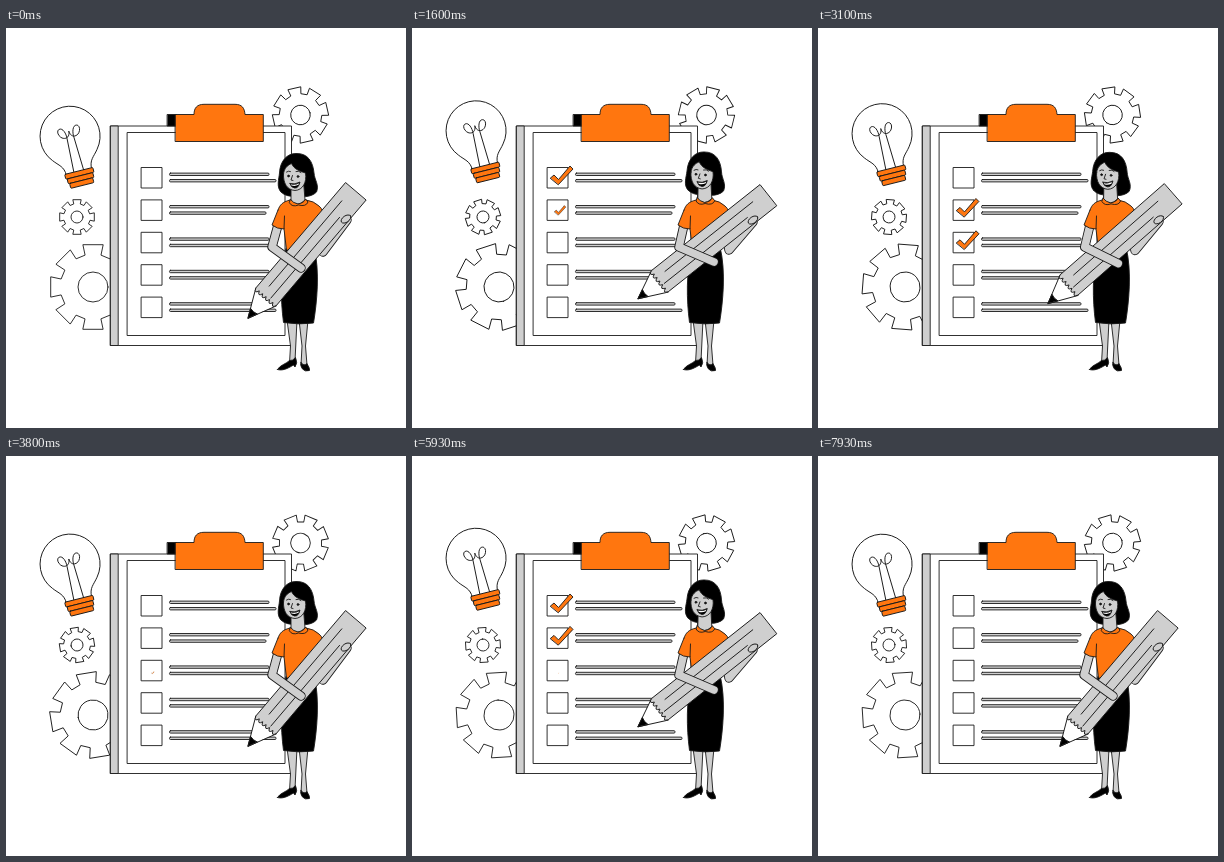
An HTML page for the animation above (8.01 s loop, 400 by 400 pixels).

```html
<!DOCTYPE html>
<html lang="en">
<head>
<meta charset="utf-8">
<title>Checklist</title>
<style>
  html, body { margin: 0; width: 100%; height: 100%; overflow: hidden; background: #fff; }
  svg { display: block; width: 100vw; height: 100vh; }
  .o { fill: #ff760f; }
  .g { fill: #cfcfcf; }
  .k { fill: #000; }
  .w { fill: #fff; }
  .n { fill: none; }
  .limb path { fill: none; stroke-width: 9.4; }
  .limb path + path { stroke: #cfcfcf; stroke-width: 7.6; }
</style>
</head>
<body>
<svg viewBox="0 0 400 400" stroke="#1a1a1a" stroke-width=".9" stroke-linejoin="round" stroke-linecap="round">
  <g id="gears" class="w"></g>

  <g id="bulb">
    <path class="w" d="M-13 37C-13 28 -18 26 -23 19.500A30 30 0 1 1 23 19.500C18 26 13 28 13 37Z"/>
    <path class="n" d="M-5 36L-3.500 2C-3 -3 -5 -10 -9 -9C-13 -8 -11 0 -6 1C-2 2 0 -2 0 -5C0 -2 2 2 6 1C11 0 13 -8 9 -9C5 -10 3 -3 3.500 2L5 36"/>
    <g id="base" class="o"></g>
  </g>

  <g id="board">
    <rect class="w" x="104.700" y="98" width="180.800" height="219.500"/>
    <rect class="g" x="104.700" y="98" width="7.500" height="219.500"/>
    <rect class="w" x="121.500" y="104.500" width="157.500" height="203"/>
    <rect class="k" x="161.500" y="86.500" width="9" height="11.500"/>
    <path class="o" d="M169.500 86.500H188C188 80 191 76.300 198 76.300H229C236 76.300 238.500 80 239 86.500H257.300V113.500H169.500Z"/>
  </g>
  <g id="rows"></g>

  <g id="legs">
    <path class="g" d="M281 292L284.500 318L283.500 335L289 333L291 292Z"/>
    <path class="g" d="M293 292L296 318L295 337L301 337L299.500 318L302 292Z"/>
    <path class="k" d="M271.500 341.500C274 337 280 336 283.500 332.500Q287 333 289.500 329.500Q292 335 289 339L287.500 337C281 341 276 343 271.500 341.500Z"/>
    <path class="k" d="M295 334.500Q298 339 301 335.500C302 338 304 340 303.500 342.500Q299 344 296.500 341Q294 338 295 334.500Z"/>
  </g>
  <path class="k" d="M280 221L308 219C314 243 311 274 307.500 295Q293 297 277.500 294.500C274.500 272 274 244 280 221Z"/>

  <g id="farArm" class="limb"><path/><path/></g>
  <path class="o" d="M284 172C276 174 274 177 272 182L278 201L280.500 222Q293 224 307 221L308 200L317 190Q318 182 313 178Q308 173 300 172Z"/>
  <g id="head">
    <path class="k" d="M275 164C270 159 273 151 273.500 145C274 133 281 125.500 290 125.500C302 125 307 134 308 145C308.500 152 313.500 157 310.500 164C305 170 294 169 288 168Q280 169 275 164Z"/>
    <path class="g" d="M285 158L285 173Q291 180 299 172L297.500 153Z"/>
    <path class="g" d="M277.500 146C278 140 282 137 285.500 135.500C288 141 293 143 299.500 145C301 154 297 162 289 162.500C281 162 277 155 277.500 146Z"/>
    <path class="n" d="M280.500 144Q282.500 142.500 284.500 143.500M290 143.500Q293 142.500 295 144.500M286.500 147.500L285 152L287 152.500"/>
    <circle class="k" cx="282.500" cy="148" r=".9"/>
    <circle class="k" cx="292" cy="148.500" r=".9"/>
    <path class="k" d="M284 155.500Q289 157 294 154Q292.500 160.500 288.500 160Q285 159.500 284 155.500Z"/>
    <path class="w" stroke="none" d="M285 156.200Q289 157.600 293 155.200L292.500 156.800Q289 158.600 285.500 157.400Z"/>
    <path class="o" d="M284.500 171.500Q287 175 292 176Q298 175 299.500 171L302 174Q300 179 292.500 177Q286 179.500 283.500 175Z"/>
  </g>

  <g id="pencil">
    <path class="w" d="M0 0L28 -13.500L31 0L28 13.500Z"/>
    <path class="k" d="M0 0L9 -4.300Q7.500 0 9 4.300Z"/>
    <path id="wood" class="g"/>
    <path class="n" d="M38 -4.500H150M30 4.500H136"/>
  </g>
  <g id="nearArm" class="limb"><path/><path/></g>
  <path class="o" d="M272 182L266 197Q271 201 278 201L278.500 188"/>
  <ellipse id="fingers" class="g" rx="5.500" ry="3.200"/>
</svg>

<script>
const LOOP = 8010, CYCLE = LOOP / 2;
const $ = id => document.getElementById(id);
const clamp = v => Math.min(1, Math.max(0, v));
const ease = v => v * v * (3 - 2 * v);
const ramp = (t, from, to) => ease(clamp((t - from) / (to - from)));
const mix = (a, b, k) => a + (b - a) * k;
const range = n => [...Array(n).keys()];
const place = (id, value) => $(id).setAttribute("transform", value);

// Eight slightly flared teeth.
function gearPath(outer) {
  const root = outer * 0.755;
  const point = (r, deg) => {
    const a = deg * Math.PI / 180;
    return `${r * Math.cos(a)} ${r * Math.sin(a)}`;
  };
  return "M" + range(8).map(i => i * 45).map(a => [
    point(root, a - 14), point(outer, a - 13.5),
    point(outer, a + 13.5), point(root, a + 14)
  ].join("L")).join("L") + "Z";
}

const gears = [
  { x: 87, y: 259, outer: 43.5, hole: 15, phase: 0 },
  { x: 71, y: 189, outer: 17.8, hole: 6, phase: 0 },
  { x: 294.5, y: 87, outer: 28.2, hole: 9.8, phase: -13 }
];
$("gears").innerHTML = gears.map(g =>
  `<g><path d="${gearPath(g.outer)}"/><circle r="${g.hole}"/></g>`).join("");
const wheels = [...$("gears").children];

$("base").innerHTML = range(3).map(i => {
  const half = 14.5 - i * 1.3;
  return `<rect x="${-half}" y="${36 + i * 5}" width="${2 * half}" height="5" rx="1"/>`;
}).join("");

const ROW = 32.4;
const bar = (y, end) => `<rect class="g" x="163.500" y="${y}" width="${end - 163.5}" height="2.400" rx="1"/>`;
const tick = '<path class="o check" d="M138.500 10.500L142 7.500L146.500 12L158 -1.500L161 1.500L146.500 17Z"/>';
$("rows").innerHTML = range(5).map(i =>
  `<g transform="translate(0 ${139.5 + i * ROW})">
    <rect class="w" x="135.500" y="0" width="20.500" height="20.500"/>
    ${bar(5.6, 263)}${bar(12, i === 1 ? 260 : 270)}${i < 3 ? tick : ""}
  </g>`).join("");
const checks = [...document.querySelectorAll(".check")];

// Body of the pencil with a scalloped edge where it was sharpened.
$("wood").setAttribute("d",
  "M166 -13.500H28" + "q-6 2.250 0 4.500".repeat(6) + "H166Z");

function bend(id, shoulder, elbow, hand) {
  for (const el of $(id).children) {
    el.setAttribute("d", `M${shoulder}L${elbow}L${hand}`);
  }
}

function draw(time) {
  const t = time % CYCLE;

  wheels.forEach((el, i) => {
    const g = gears[i];
    el.setAttribute("transform", `translate(${g.x} ${g.y}) rotate(${g.phase + 360 * time / LOOP})`);
  });

  const lift = 3 * (1 - Math.cos(2 * Math.PI * t / CYCLE));
  place("bulb", `translate(64 ${108 - lift}) rotate(-14)`);

  // 0 holds the pencil steep, 1 holds it flat.
  const k = ramp(t, 200, 880) - ramp(t, 2840, 3640);
  place("pencil", `translate(${mix(242, 226, k)} ${mix(290, 270.5, k)}) rotate(${mix(-49.6, -38.4, k)})`);
  place("head", `translate(${k * 0.8} ${-k * 1.5}) rotate(${k * 1.5} 292 172)`);
  bend("nearArm", [272, 197], [mix(266, 267, k), 219], [mix(295, 302, k), mix(240, 234, k)]);
  bend("farArm", [311, 190], [317, mix(224, 222, k)], [341, mix(192, 194, k)]);
  place("fingers", `translate(${mix(340, 341, k)} ${mix(191, 192, k)}) rotate(-35)`);

  checks.forEach((el, i) => {
    const s = t - i * 450;
    const size = ramp(s, 985, 1315) - ramp(s, 2635, 2975);
    el.style.display = size > 0.005 ? "" : "none";
    el.setAttribute("transform", `translate(146.500 13) scale(${size}) translate(-146.500 -13)`);
  });
}

const start = performance.now();
function frame(now) {
  draw(Math.max(0, now - start) % LOOP);
  requestAnimationFrame(frame);
}
draw(0);
requestAnimationFrame(frame);
</script>
</body>
</html>
```
